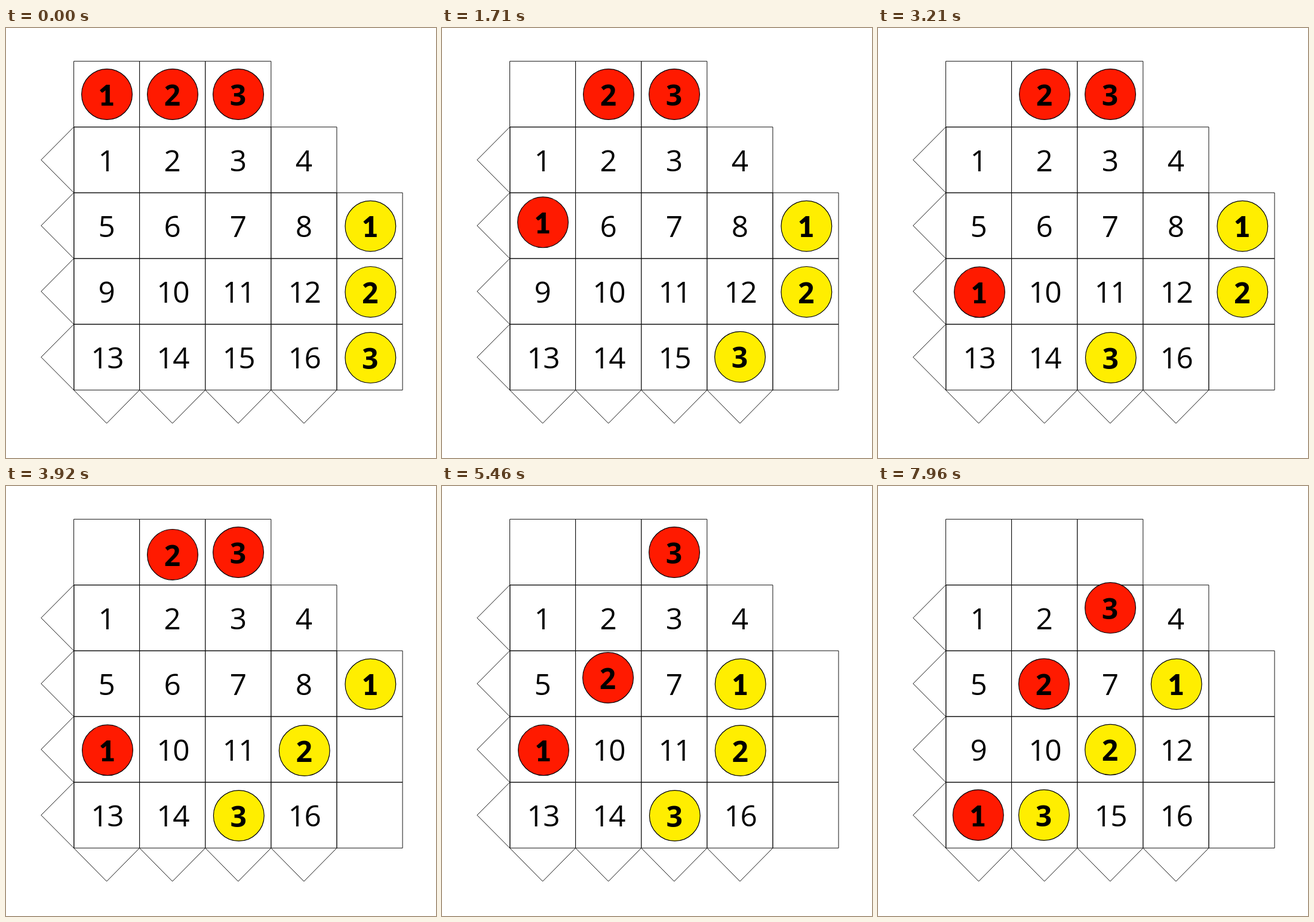
An HTML page that plays this animation: 720 by 720 pixels, repeating every 8000 ms.

```html
<!DOCTYPE html>
<html lang="en">
<head>
<meta charset="utf-8">
<title>Sliding counters</title>
<style>
  html, body { margin: 0; width: 100%; height: 100%; overflow: hidden; background: #fff; }
  svg { display: block; width: 100%; height: 100%; }
  text { text-anchor: middle; font-family: "Open Sans", "Noto Sans", sans-serif; }
  .label { font-size: 49.5px; letter-spacing: -1.4px; }
  .coin text { font-size: 48px; font-weight: 700; }
  .coin .one { font-family: Lato, "Open Sans", sans-serif; font-weight: 900; font-size: 47px; }
  .coin circle { stroke: #000; stroke-width: 1.2; }
  .grid { fill: none; stroke: #111; stroke-width: 1; }
</style>
</head>
<body>
<svg id="stage" viewBox="0 0 720 720"></svg>
<script>
const LOOP = 8000, FPS = 24, MOVE = 420;
const LEFT = 113.5, TOP = 55.7, CELL = 110.1;
const stage = document.getElementById("stage");

function add(parent, name, attrs, text) {
  const node = document.createElementNS("http://www.w3.org/2000/svg", name);
  for (const key in attrs) node.setAttribute(key, attrs[key]);
  if (text !== undefined) node.textContent = text;
  return parent.appendChild(node);
}

const col = i => LEFT + i * CELL;
const row = i => TOP + i * CELL;

// Board: red row on top, four by four cells, yellow column at the right
function drawBoard() {
  let path = "";
  const cell = (x, y) => { path += `M${col(x)} ${row(y)}H${col(x + 1)}V${row(y + 1)}H${col(x)}Z`; };
  for (let i = 0; i < 3; i++) { cell(i, 0); cell(4, i + 2); }
  for (let i = 0; i < 16; i++) cell(i % 4, 1 + (i >> 2));
  add(stage, "path", { class: "grid", d: path });
  add(stage, "path", { class: "grid", d: `M114 ${row(1)}V${row(5)}`, "stroke-width": 1.5 });

  let tips = "";
  for (let i = 0; i < 4; i++) {
    tips += `M${LEFT} ${row(i + 1)}L58.8 ${row(i + 1.5)}L${LEFT} ${row(i + 2)}`;
    tips += `M${col(i)} ${row(5)}L${col(i + 0.5)} 662L${col(i + 1)} ${row(5)}`;
  }
  add(stage, "path", { class: "grid", d: tips });

  for (let i = 0; i < 16; i++) {
    const shift = i > 8 ? 0.6 : -0.6;
    add(stage, "text", { class: "label", x: col(i % 4 + 0.5) + shift, y: row(1.5 + (i >> 2)) + 19.2 }, i + 1);
  }
}

function makeCoin(color, digit, x, y) {
  const node = add(stage, "g", { class: "coin" });
  add(node, "circle", { r: 42.4, fill: color });
  add(node, "text", { x: -0.6, y: 18.6, class: digit === 1 ? "one" : "" }, digit);
  return { node, x, y };
}

drawBoard();
const coins = {};
for (let i = 1; i <= 3; i++) {
  coins["r" + i] = makeCoin("#ff1a00", i, 59 + 110 * i, 111);
  coins["y" + i] = makeCoin("#ffee00", i, 610.3, 221.5 + 110.2 * i);
}

// Start time, coin, destination
const moves = [
  [100, "r1", 169, 221],
  [725, "y3", 499, 550.7],
  [1353, "r1", 169, 331.7],
  [1980, "y3", 389.8, 552],
  [2615, "r1", 170, 442.3],
  [3240, "y2", 499.7, 443],
  [3866, "r2", 278.5, 221],
  [4494, "y1", 499.7, 331.7],
  [5122, "r2", 278, 331.5],
  [5735, "y3", 278, 551],
  [6343, "r1", 167.8, 551],
  [6995, "y2", 389, 441.5],
  [7646, "r3", 389, 221]
];

const ease = p => (1 - Math.cos(Math.PI * Math.min(1, Math.max(0, p)))) / 2;

function draw(time) {
  const pose = {};
  for (const id in coins) pose[id] = [coins[id].x, coins[id].y];
  for (const [start, id, x, y] of moves) {
    const k = ease((time - start) / MOVE), at = pose[id];
    pose[id] = [at[0] + (x - at[0]) * k, at[1] + (y - at[1]) * k];
  }
  for (const id in coins) coins[id].node.setAttribute("transform", `translate(${pose[id]})`);
}

const begin = performance.now();
function tick() {
  const time = (performance.now() - begin) % LOOP;
  draw(Math.floor(time * FPS / 1000) * 1000 / FPS);
  requestAnimationFrame(tick);
}
tick();
</script>
</body>
</html>
```
